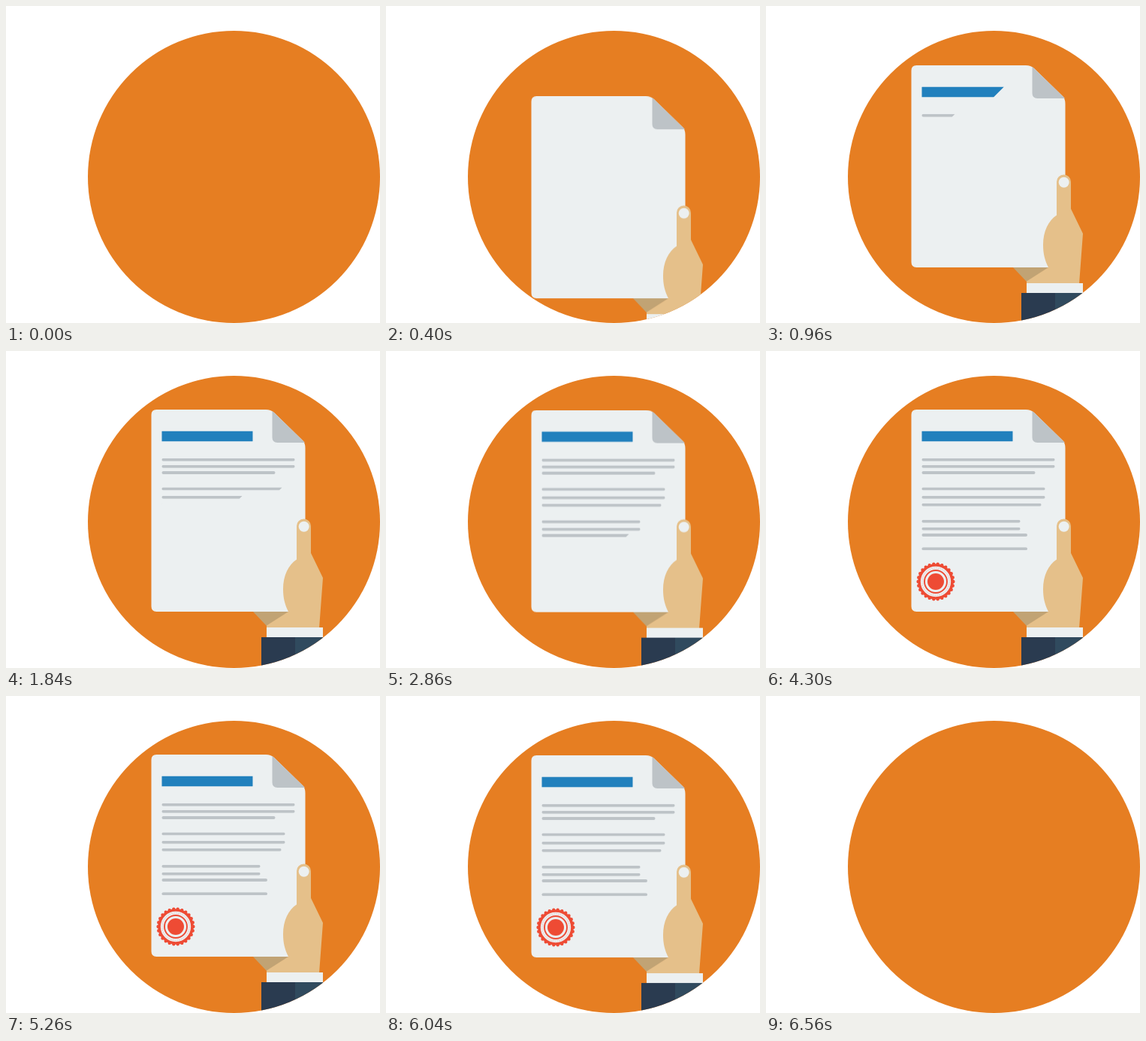
These frames come from a looping animation (498x422 px, 7.2 s). An HTML page without scripts:

```html
<!DOCTYPE html>
<html lang="en">
<head>
<meta charset="utf-8">
<title>Signed document</title>
<style>
  /* --t is the clock of the loop in ms; parts derive their progress from it */
  @property --t { syntax: "<number>"; inherits: true; initial-value: 0; }

  html, body { margin: 0; width: 100%; height: 100%; overflow: hidden; background: #fff; }
  svg { display: block; width: 498px; height: 422px; animation: clock 7200ms linear infinite; }
  @keyframes clock { to { --t: 7200; } }

  .sheet { animation: slide 7200ms infinite; }
  @keyframes slide {
    0%, 1.1% { transform: translateY(346px); animation-timing-function: cubic-bezier(.2, .6, .3, 1); }
    10.4% { transform: translateY(0); animation-timing-function: ease-in-out; }
    13.3% { transform: translateY(1px); animation-timing-function: ease-in-out; }
    25.5% { transform: translateY(0); animation-timing-function: ease-in-out; }
    39.7% { transform: translateY(.6px); animation-timing-function: ease-in-out; }
    59%, 83.4% { transform: translateY(0); animation-timing-function: cubic-bezier(.5, 0, .8, .5); }
    91.1%, 100% { transform: translateY(346px); }
  }

  .bar, .seal {
    --p: clamp(0, (var(--t) - var(--start)) / 600, 1);
    --ease: (var(--p) * var(--p) * (3 - 2 * var(--p)));
  }
  /* wipe from left to right with a 45 degree edge */
  .bar {
    --x: (100% + var(--h)) * var(--ease);
    height: var(--h);
    clip-path: polygon(0 0, calc(var(--x)) 0, calc(var(--x) - var(--h)) 100%, calc(0px - var(--h)) 100%);
  }
  .title { --h: 14px; fill: #2180bd; }
  .line { --h: 4px; fill: #bdc3c7; rx: 2px; }
  .seal { transform: translate(226px, 307px) scale(calc(var(--ease))); }
</style>
</head>
<body>
<svg viewBox="0 0 498 422">
  <clipPath id="disc"><circle cx="303.5" cy="227.5" r="194.5"/></clipPath>
  <circle cx="303.5" cy="227.5" r="194.5" fill="#e67e22"/>

  <g clip-path="url(#disc)">
    <g class="sheet">
      <path fill="#ecf0f1" d="M200.500 78H346Q352.500 78 357 82L394 118Q398.500 122 398.500 129V347H200.500q-7 0-7-7V85q0-7 7-7Z"/>
      <path fill="#bdc3c7" d="M354.500 80V115q0 7 7 7H398Q397 120.500 394 118L357 82Z"/>

      <rect class="bar title" x="207.500" y="106.500" width="121" style="--start:528"/>
      <g>
        <rect class="bar line" x="207.500" y="142.700" width="177" style="--start:768"/>
        <rect class="bar line" x="207.500" y="151.700" width="177" style="--start:955"/>
        <rect class="bar line" x="207.500" y="160" width="151" style="--start:1135"/>
        <rect class="bar line" x="207.500" y="181.400" width="164" style="--start:1319"/>
        <rect class="bar line" x="207.500" y="192.700" width="164" style="--start:1485"/>
        <rect class="bar line" x="207.500" y="202.700" width="159" style="--start:1815"/>
        <rect class="bar line" x="207.500" y="224.800" width="131" style="--start:2000"/>
        <rect class="bar line" x="207.500" y="234.700" width="131" style="--start:2190"/>
        <rect class="bar line" x="207.500" y="243" width="140.500" style="--start:2432"/>
        <rect class="bar line" x="207.500" y="261.200" width="140.500" style="--start:2840"/>
      </g>

      <g class="seal" style="--start:3300" fill="none" stroke="#ee4b34">
        <circle r="22" stroke-width="3.600"/>
        <circle r="23.400" stroke-width="4.400" stroke-linecap="round" pathLength="26" stroke-dasharray="0 1"/>
        <circle r="18.200" stroke-width=".8" stroke-opacity=".4" pathLength="40" stroke-dasharray=".5 .5"/>
        <circle r="15" stroke-width="1.900"/>
        <circle r="11" fill="#ee4b34" stroke="none"/>
      </g>

      <path fill="#c1a374" d="M329 347H377L347 366Z"/>
      <path fill="#e5c08a" d="M387 277.500V233a9.500 9.500 0 0 1 19 0V269L422 302L417 369H347V365.500L376 347C371 337 369 328 369 317C369 299 376 285 387 277.500Z"/>
      <circle cx="396.700" cy="233.700" r="7" fill="#ecf0f1"/>
      <rect x="347" y="368" width="75" height="13" fill="#ecf0f1"/>
      <rect x="340" y="381" width="82" height="45" fill="#2a3b50"/>
      <rect x="385" y="381" width="37" height="45" fill="#304a5e"/>
    </g>
  </g>
</svg>
</body>
</html>
```
